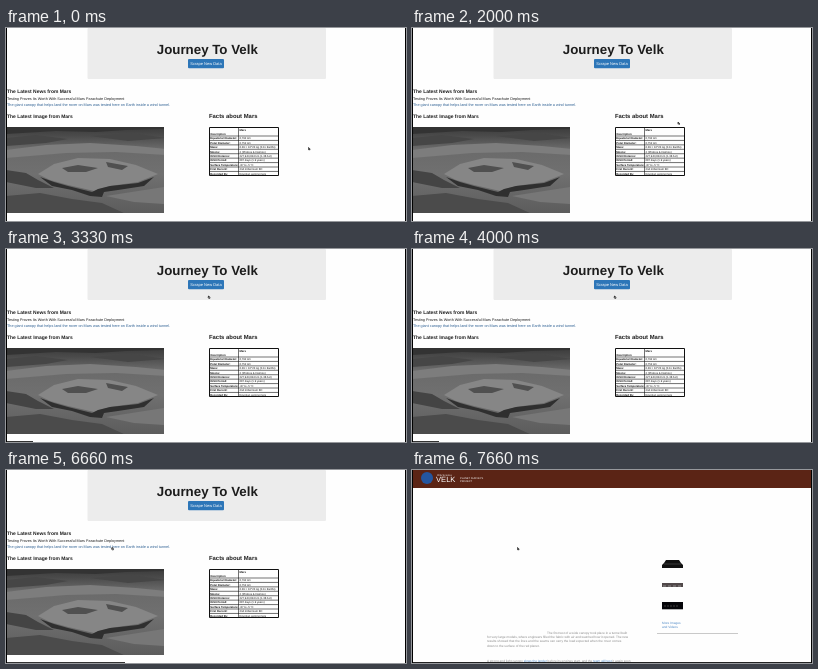
An HTML page that plays this animation: 400 by 193 pixels, repeating every 8000 ms.

```html
<!DOCTYPE html>
<html lang="en">
<head>
<meta charset="utf-8">
<title>Journey To Velk</title>
<style>
  html, body { margin: 0; width: 100%; height: 100%; overflow: hidden; background: #fff; }
  svg { display: block; width: 100%; height: 100%; }
  text { font-family: "Liberation Sans", Arial, sans-serif; fill: #1c1c1c; text-rendering: geometricPrecision; }
  .bold { font-weight: 700; }
  .center { text-anchor: middle; }
  #home .white, #brand text { fill: #fff; }
  .grid { fill: none; stroke: #111; stroke-width: .6; }
  .border { fill: none; stroke: #111; }
  #facts text { font-size: 2.75px; fill: #111; }
  #article text { font-size: 3.2px; fill: #888; }
  #article .link { fill: #4a86c5; }
  #article #brand text { fill: #fff; font-size: 2.6px; }
  #article #brand .wordmark { font-size: 7.6px; }
</style>
</head>
<body>
<svg viewBox="0 0 400 193">
  <defs>
    <linearGradient id="ground" x2="0" y2="1">
      <stop offset="0" stop-color="#3c3c3c"/>
      <stop offset=".1" stop-color="#4a4a4a"/>
      <stop offset=".25" stop-color="#6a6a6a"/>
      <stop offset=".55" stop-color="#707070"/>
      <stop offset="1" stop-color="#5c5c5c"/>
    </linearGradient>
    <filter id="soft"><feGaussianBlur stdDeviation=".6"/></filter>
    <clipPath id="photoFrame"><path d="M1 99H158V185H1Z"/></clipPath>
  </defs>

  <g id="home">
    <rect width="400" height="193" fill="#fefefe"/>
    <rect x="81.5" width="238.5" height="51" rx="1" fill="#ececec"/>
    <text class="bold center" x="201.3" y="26.3" font-size="13.3">Journey To Velk</text>
    <rect x="182" y="31" width="36" height="9.2" rx="1" fill="#2d76b8"/>
    <text class="white center" x="200" y="37.1" font-size="4">Scrape New Data</text>

    <text class="bold" x="1" y="65.4" font-size="4.95">The Latest News from Mars</text>
    <text x="1" y="72" font-size="3.77">Testing Proves Its Worth With Successful Mars Parachute Deployment</text>
    <text x="1" y="78" font-size="3.77" style="fill:#2c5f92">The giant canopy that helps land the rover on Mars was tested here on Earth inside a wind tunnel.</text>
    <text class="bold" x="1" y="89.6" font-size="4.97">The Latest Image from Mars</text>
    <text class="bold" x="203" y="89.6" font-size="5.9">Facts about Mars</text>

    <g clip-path="url(#photoFrame)">
      <rect x="1" y="99" width="157" height="86" fill="url(#ground)"/>
      <g filter="url(#soft)">
        <path fill="#333" d="M0 98H160V101L120 102 90 104 50 103 0 106Z"/>
        <path fill="#464646" d="M0 110L30 107 62 111 40 115 0 118ZM84 108L126 105 160 110 122 113Z"/>
        <path fill="#7d7d7d" d="M0 122L40 117 84 115 130 118 160 121V127L110 124 60 125 0 130Z"/>
        <path fill="#868686" d="M32 146L48 136 72 130 104 131 130 137 152 146 132 154 104 158 88 163 62 157 44 152Z"/>
        <path fill="#505050" d="M56 140L72 137 92 140 80 144 62 144ZM100 134L122 138 116 142 102 139Z"/>
        <path fill="#2f2f2f" d="M34 149L48 154 62 158 86 164 92 161 104 158 132 155 148 149 138 158 112 162 98 164 96 169 84 168 66 162 46 158Z"/>
        <path fill="#444" d="M0 142L20 145 32 152 48 160 30 160 0 154Z"/>
        <path fill="#4b4b4b" d="M0 168L34 165 66 171 96 175 120 186H0Z"/>
        <path fill="#777" d="M100 168L132 163 158 159V176L128 174Z"/>
      </g>
    </g>

    <g id="facts">
      <text class="bold" x="233.5" y="103">Mars</text>
      <text class="bold" x="204.5" y="107">Description</text>
    </g>
  </g>

  <rect id="dim" width="400" height="193" fill="#38373b"/>

  <g id="article">
    <rect width="400" height="193" fill="#fefefe"/>
    <rect width="400" height="18" fill="#5b2415"/>
    <circle cx="15" cy="8" r="6" fill="#2456a0"/>
    <g id="brand">
      <text x="25" y="5.5">Orlu Science</text>
      <text class="wordmark" x="24" y="12.4">VELK</text>
      <text x="48" y="8.8">PLANET SURVEYS</text>
      <text x="48" y="12">PROJECT</text>
    </g>
    <path d="M254 90H267L269 93 271 95V98H250V95L252 93Z" fill="#111"/>
    <path d="M252 94H269" stroke="#555" stroke-width=".6"/>
    <rect x="250" y="113" width="21" height="4" fill="#51494a"/>
    <path d="M251 116H270" stroke="#aaa" stroke-width=".7" stroke-dasharray="3 2"/>
    <rect x="250" y="132" width="21" height="7.3" fill="#050509"/>
    <path d="M252 136H266" stroke="#666" stroke-width=".6" stroke-dasharray="2 1"/>
    <text class="link" x="250" y="153.5">More Images</text>
    <text class="link" x="250" y="158">and Videos</text>
    <path d="M245 163.5H326" stroke="#bbb" stroke-width=".8"/>
    <text x="135" y="164">The first test of a wide canopy took place in a tunnel built</text>
    <text x="75" y="168.2">for very large models, where engineers filled the fabric with air and watched how it opened. The new</text>
    <text x="75" y="172.4">results showed that the lines and the seams can carry the load expected when the rover comes</text>
    <text x="75" y="176.6">down to the surface of the red planet.</text>
    <text x="75" y="191.5">A strong and light canopy <tspan class="link">slows the lander</tspan> before its engines start, and the <tspan class="link">team will test</tspan> it again soon</text>
    <path d="M0 192.5H400" stroke="#222"/>
  </g>

  <rect id="status" y="192" height="1" fill="#333"/>
  <path d="M.5 0V193M399.5 0V193" stroke="#000"/>
  <path id="cursor" fill="#fff" stroke="#111" stroke-width=".7" stroke-linejoin="round"/>
</svg>

<script>
const DURATION = 8000;
const $ = id => document.getElementById(id);

const facts = [
  ["Equatorial Diameter:", "6,792 km"],
  ["Polar Diameter:", "6,752 km"],
  ["Mass:", "6.39 × 10^23 kg (0.11 Earths)"],
  ["Moons:", "2 (Phobos & Deimos)"],
  ["Orbit Distance:", "227,943,824 km (1.38 AU)"],
  ["Orbit Period:", "687 days (1.9 years)"],
  ["Surface Temperature:", "-87 to -5 °C"],
  ["First Record:", "2nd millennium BC"],
  ["Recorded By:", "Egyptian astronomers"]
];

function add(tag, attributes, content = "") {
  const node = document.createElementNS("http://www.w3.org/2000/svg", tag);
  for (const [key, value] of Object.entries(attributes)) node.setAttribute(key, value);
  node.textContent = content;
  $("facts").append(node);
}

const firstRow = 108, rowHeight = 4.43;
let lines = "M232.5 99V148";
facts.forEach(([label, value], i) => {
  const y = firstRow + i * rowHeight;
  lines += `M203.5 ${y}H272.5`;
  add("text", { x: 204.2, y: y + 3.3, class: "bold" }, label);
  add("text", { x: 233.5, y: y + 3.3 }, value);
});
add("path", { d: lines, class: "grid" });
add("path", { d: "M203.5 99.5H272.5V147.5H203.5Z", class: "border" });

const shapes = {
  arrow: "M0 0V2.2L.6 1.7 1.1 2.6 1.4 2.4 1 1.6H1.7Z",
  hand: "M.4 0V1.3L0 1.2 .7 2.4H1.8L2 1.1 .9 .9V0Z"
};

const pointer = [
  [0, 302.5, 119.5, "arrow"],
  [1000, 304, 119.5, "arrow"],
  [1330, 290.5, 111, "arrow"],
  [1660, 266, 94, "arrow"],
  [2330, 259.5, 72, "arrow"],
  [2660, 212.5, 45.5, "arrow"],
  [3000, 203, 37, "hand"],
  [3330, 202, 47, "hand"],
  [5330, 150, 63, "arrow"],
  [5660, 105.5, 77.5, "hand"],
  [7330, 105.5, 77.5, "arrow"]
];

// Start time and width of the browser's status strip.
const status = [[0, 0], [3000, 27], [4330, 0], [5660, 119], [7330, 0]];

const current = (steps, time) => steps.findLast(([start]) => start <= time);
const show = (id, visible) => $(id).style.display = visible ? "" : "none";

function draw(now) {
  const time = now % DURATION;
  show("home", time < 7330);
  show("dim", time >= 7330 && time < 7660);
  show("article", time >= 7660);
  $("status").setAttribute("width", current(status, time)[1]);

  const [, x, y, shape] = current(pointer, time);
  $("cursor").setAttribute("d", shapes[shape]);
  $("cursor").setAttribute("transform", `translate(${x} ${y})`);
  requestAnimationFrame(draw);
}
draw(performance.now());
</script>
</body>
</html>
```
